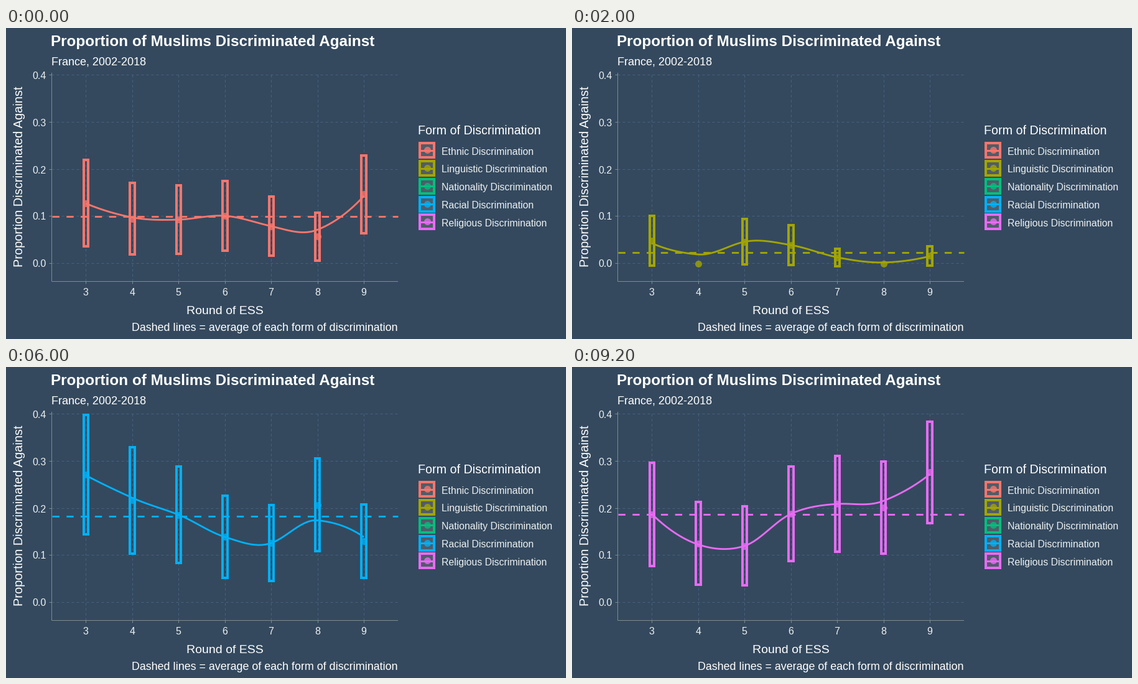
Recreate the animation shown at these times as a matplotlib script. Size 900 px wide and 500 px high, loop 10000 ms.

```python
import numpy as np
import matplotlib.pyplot as plt
from matplotlib.animation import FuncAnimation

W, H, DPI = 900, 500, 100
PX = 72 / DPI  # points per pixel
BG, INK, TITLE = "#34495e", "#ecf0f1", "#ffffff"
AXIS, GRID, KEY = "#7f8c8d", "#46627f", "#515c69"
LEFT, RIGHT, TOP, BOTTOM = 73.5, 630, 72, 407.5
ROUNDS = np.arange(3, 10)
DASH = (0, (4, 4))

# form of discrimination: colour, cases per thousand in each round
FORMS = {
    "Ethnic": ("#f8766d", [128, 95, 93, 101, 79, 57, 147]),
    "Linguistic": ("#a3a500", [48, 0, 46, 39, 13, 0, 16]),
    "Nationality": ("#00bf7d", [179, 145, 78, 84, 123, 36, 146]),
    "Racial": ("#00b0f6", [271, 217, 186, 139, 126, 207, 130]),
    "Religious": ("#e76bf3", [187, 125, 120, 188, 209, 201, 276]),
}

plt.rcParams["font.family"] = "Liberation Sans"
fig = plt.figure(figsize=(W / DPI, H / DPI), dpi=DPI, facecolor=BG)
ax = fig.add_axes([0, 0, 1, 1])
ax.set_xlim(0, W)
ax.set_ylim(H, 0)
ax.axis("off")


def px(r):
    return 128.46 + 74.45 * (np.asarray(r) - 3)


def py(v):
    return 378.5 - 757.5 * np.asarray(v)


def line(x, y, color, width=1, **kw):
    kw.setdefault("solid_capstyle", "butt")
    return ax.plot(x, y, color=color, lw=width * PX, **kw)[0]


def hair(x, y, color, **kw):
    """One-pixel line whose ends are given at pixel centres."""
    return line(x, y, color, snap=False, **kw)


def box(x0, x1, y0, y1, color):
    return line([x0, x1, x1, x0, x0], [y0, y0, y1, y1, y0], color, 4,
                solid_joinstyle="miter", solid_capstyle="projecting")


def dots(x, y, color):
    return ax.plot(x, y, "o", color=color, ms=11 * PX, mew=0, alpha=.8)[0]


def text(x, y, s, size, color=TITLE, **kw):
    ax.text(x, y, s, fontsize=size * PX, color=color, va="baseline", **kw)


def margin(p):
    """95% interval half-width; samples grow by round, rare answers vary less."""
    n = (44 + 3 * (ROUNDS - 3)) / p.clip(1e-9) * (p + .02)
    return 1.96 * np.sqrt(p * (1 - p) / n)


def loess(x, y, near=5):
    """Local quadratic fit at each x, joined by cubic Hermite pieces."""
    val, slope = np.zeros((2, len(x)))
    for k, x0 in enumerate(x):
        d = np.abs(x - x0)
        w = np.clip(1 - (d / np.sort(d)[near - 1]) ** 3, 0, None) ** 1.5
        basis = np.vander(x - x0, 3, increasing=True)
        fit = np.linalg.lstsq(basis * w[:, None], y * w, rcond=None)[0]
        val[k], slope[k] = fit[:2]
    t = np.linspace(x[0], x[-1], 80)
    i = np.minimum((t - x[0]).astype(int), len(x) - 2)
    u = t - x[i]
    return t, (val[i] * (1 + 2 * u) * (1 - u) ** 2 + slope[i] * u * (1 - u) ** 2
               + val[i + 1] * u * u * (3 - 2 * u) + slope[i + 1] * u * u * (u - 1))


def draw_axes():
    for v in np.arange(5) / 10:
        y = np.floor(py(v)) + .5
        hair([LEFT, RIGHT], [y, y], GRID, linestyle=DASH)
        hair([LEFT - 4, LEFT], [y, y], AXIS)
        text(64.5, y + 6, f"{v:.1f}", 16, INK, ha="right")
    for r in ROUNDS:
        x = np.round(px(r)) + .5
        hair([x, x], [BOTTOM, TOP], GRID, linestyle=DASH)
        hair([x, x], [BOTTOM, BOTTOM + 4], AXIS)
        text(x - .5, 430, str(r), 16, INK, ha="center")
    hair([LEFT, LEFT], [TOP, BOTTOM], AXIS)
    hair([LEFT, RIGHT], [BOTTOM, BOTTOM], AXIS)


def draw_labels():
    text(72.5, 29, "Proportion of Muslims Discriminated Against", 24.2,
         weight="bold")
    text(73, 60, "France, 2002-2018", 18)
    text(352, 460, "Round of ESS", 19.5, ha="center")
    text(27, 384.5, "Proportion Discriminated Against", 20,
         rotation=90, rotation_mode="anchor")
    text(630, 487, "Dashed lines = average of each form of discrimination",
         17.85, ha="right")


def draw_legend():
    x0, x1 = 665, 688
    text(661.5, 171, "Form of Discrimination", 19.6)
    for k, (name, (color, _)) in enumerate(FORMS.items()):
        y = 196.7 + 28.8 * k
        ax.fill_between([x0, x1], y - 11.5, y + 11.5, color=KEY, lw=0)
        line([x0, x1], [y, y], color, 3)
        box(x0, x1, y - 11.5, y + 11.5, color)
        dots([(x0 + x1) / 2], [y - .5], color)
        text(700.5, round(y + 7), f"{name} Discrimination", 15.85, INK)


def draw_form(color, cases):
    p = np.array(cases) / 1000
    x, m = px(ROUNDS), margin(p)
    t, fit = loess(ROUNDS, p)
    mean = py([p.mean()] * 2)
    bars = [box(a - 3.7, a + 3.7, py(b + c), py(b - c), color)
            for a, b, c in zip(x, p, m) if b > 0]
    return bars + [
        line([LEFT, RIGHT], mean, color, 2.85, linestyle=DASH),
        line(px(t), py(fit), color, 2.85),
        dots(x, py(p), color),
    ]


draw_axes()
draw_labels()
draw_legend()
layers = [draw_form(*form) for form in FORMS.values()]


def update(i):
    for k, parts in enumerate(layers):
        for part in parts:
            part.set_visible(k == i)
    return []


anim = FuncAnimation(fig, update, frames=len(FORMS), interval=2000,
                     repeat=True, repeat_delay=0, blit=False)
plt.show()
```
